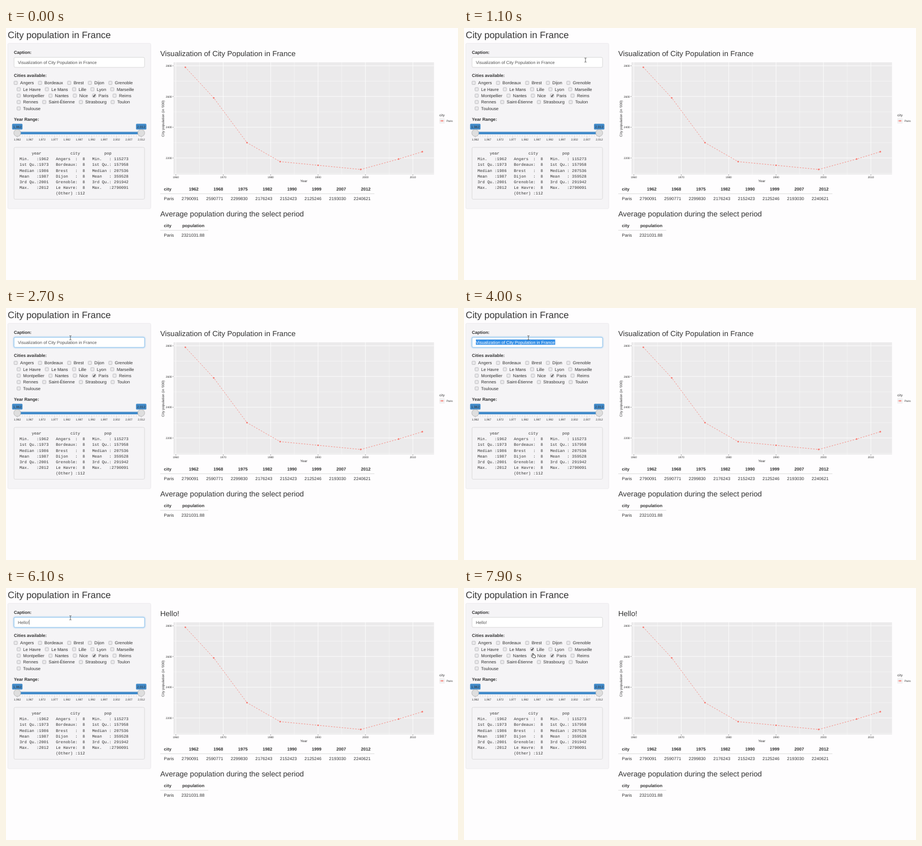
These frames come from a looping animation (800x448 px, 8 s). An HTML page:

```html
<!DOCTYPE html>
<html lang="en">
<head>
<meta charset="utf-8">
<title>City population</title>
<style>
  html, body { margin: 0; width: 100%; height: 100%; overflow: hidden; background: #fefdfe; }
  svg { display: block; }
  text { font-family: "Liberation Sans", Arial, sans-serif; fill: #333; white-space: pre; text-rendering: geometricPrecision; }
  .mono { font-family: "Liberation Mono", monospace; }
</style>
</head>
<body>
<svg id="stage" width="800" height="448" viewBox="0 0 800 448"></svg>
<script>
const stage = document.getElementById('stage');
const BODY = 7.7, HEAD = 13.2, RED = '#f8766d', BLUE = '#428bca';
const CAPTION = 'Visualization of City Population in France';

function el(tag, attrs, parent = stage) {
  const node = document.createElementNS('http://www.w3.org/2000/svg', tag);
  for (const key in attrs) node.setAttribute(key, attrs[key]);
  parent.appendChild(node);
  return node;
}
function text(str, x, y, size = BODY, attrs = {}) {
  const node = el('text', { x, y, 'font-size': size, ...attrs });
  node.textContent = str;
  return node;
}
const bold = (str, x, y, attrs) => text(str, x, y, BODY, { 'font-weight': 700, ...attrs });
const rect = (x, y, width, height, fill, attrs) => el('rect', { x, y, width, height, fill, ...attrs });
const line = (x1, y1, x2, y2, stroke, w = 1, attrs) =>
  el('line', { x1, y1, x2, y2, stroke, 'stroke-width': w, ...attrs });
const show = (node, on) => node.setAttribute('visibility', on ? 'visible' : 'hidden');
const MID = { 'text-anchor': 'middle' }, END = { 'text-anchor': 'end' };

// Sidebar
text('City population in France', 3, 17.9, 16.5);
rect(3.25, 27.25, 253, 294, '#f5f4f6', { rx: 2, stroke: '#e4e3e5', 'stroke-width': .6 });
bold('Caption:', 14, 45.9);
const glow = el('g', { fill: 'none', stroke: '#66afe9' });
for (const [d, opacity] of [[.6, .3], [1.5, .16], [2.4, .07]])
  el('rect', { x: 14.2 - d, y: 52.2 - d, width: 231 + 2 * d, height: 17.8 + 2 * d, rx: 2.2 + d, opacity }, glow);
const field = rect(14.2, 52.2, 231, 17.8, '#fff', { rx: 2.2, 'stroke-width': .7 });
const selection = rect(21, 56, 140.4, 9.4, '#358fe6');
const value = text(CAPTION, 21, 63.6);
const caret = rect(0, 56.4, .6, 8.6, '#333');

// Checkboxes flow from left to right by text width
function checkbox(x, y) {
  rect(x, y, 5.9, 5.9, '#e9e8ea', { rx: 1, stroke: '#adadb0', 'stroke-width': .7 });
  return el('path', { d: `M${x + 1.3} ${y + 3}l1.4 1.6 2.3-3.6`, fill: 'none', stroke: '#333', 'stroke-width': 1.3 });
}
bold('Cities available:', 14, 86.7);
const ticks = {};
[['Angers', 'Bordeaux', 'Brest', 'Dijon', 'Grenoble'],
 ['Le Havre', 'Le Mans', 'Lille', 'Lyon', 'Marseille'],
 ['Montpellier', 'Nantes', 'Nice', 'Paris', 'Reims'],
 ['Rennes', 'Saint-Étienne', 'Strasbourg', 'Toulon'],
 ['Toulouse']].forEach((row, i) => {
  let x = i ? 30.3 : 25;
  const y = 97.5 + 11.36 * i;
  for (const city of row) {
    ticks[city] = checkbox(x - 10.8, y - 2.9);
    show(ticks[city], city === 'Paris');
    x += text(city, x, y + 2.7).getComputedTextLength() + 18.7;
  }
});

// Range slider
bold('Year Range:', 14, 164.8);
rect(14, 184.6, 231, 4.4, '#e1e1e4', { rx: 2 });
rect(20, 184.6, 219.5, 4.4, BLUE);
for (let i = 0; i <= 50; i++) {
  const x = 20 + 4.39 * i, big = i % 5 === 0;
  line(x, 190.6, x, big ? 195 : 192.8, '#b9b9c0', .5);
  if (big) text((1962 + i).toLocaleString('en-US'), x, 200, 4.95, { ...MID, fill: '#999' });
}
for (const [x, year] of [[20, '1,962'], [239.3, '2,012']]) {
  rect(x - 9.2, 170.2, 18.4, 10.4, BLUE, { rx: 1.6 });
  text(year, x, 177.6, 6.05, { ...MID, fill: '#fff' });
  el('circle', { cx: x, cy: 186.6, r: 6.2, fill: '#dedede', stroke: '#aaa', 'stroke-width': .7 });
}

// Data summary
rect(14.2, 212.2, 231, 92.2, '#f5f4f6', { rx: 2, stroke: '#ccc', 'stroke-width': .6 });
[
  '     year            city          pop',
  'Min.   :1962   Angers  :  8   Min.   : 115273',
  '1st Qu.:1973   Bordeaux:  8   1st Qu.: 157958',
  'Median :1986   Brest   :  8   Median : 207536',
  'Mean   :1987   Dijon   :  8   Mean   : 359528',
  '3rd Qu.:2001   Grenoble:  8   3rd Qu.: 291942',
  'Max.   :2012   Le Havre:  8   Max.   :2790091',
  '               (Other) :112'
].forEach((str, i) => text(str, 24, 225.1 + 10.15 * i, 7.15, { class: 'mono' }));

// Chart
const heading = text(CAPTION, 273, 49.8, HEAD);
const px = year => 300.6 + 8.39 * (year - 1960);
const py = pop => 67.1 + .2733 * (2800 - pop);
const data = { 1962: 2790091, 1968: 2590771, 1975: 2299830, 1982: 2176243,
               1990: 2152423, 1999: 2125246, 2007: 2193030, 2012: 2240621 };
const years = Object.keys(data);
const points = years.map(y => [px(y), py(data[y] / 1000)]);
const DASH = { 'stroke-dasharray': '2.4 2.4' };

rect(296.4, 61, 461.1, 199.5, '#ebeaeb');
for (let y = 1960; y <= 2014; y += 5) {
  const x = px(y), major = y % 10 === 0;
  line(x, 61, x, 260.5, '#fff', major ? .8 : .4);
  if (!major) continue;
  line(x, 260.5, x, 262, '#333', .6);
  text(y, x, 267, 4.9, { ...MID, fill: '#4d4d4d' });
}
for (let p = 2100; p <= 2800; p += 100) {
  const y = py(p), major = p % 200 === 0;
  line(296.4, y, 757.5, y, '#fff', major ? .8 : .4);
  if (!major) continue;
  line(294.9, y, 296.4, y, '#333', .6);
  text(p, 293.6, y + 1.8, 4.9, { ...END, fill: '#4d4d4d' });
}
el('polyline', { points: points.join(' '), fill: 'none', stroke: RED, 'stroke-width': .8, ...DASH });
const dot = (cx, cy) => el('circle', { cx, cy, r: 1.4, fill: RED });
points.forEach(p => dot(...p));
text('Year', 527, 273.6, 6.15, { ...MID, fill: '#111' });
text("City population (in '000)", 0, 0, 6.2, { ...MID, fill: '#111', transform: 'translate(280.2 161) rotate(-90)' });
text('city', 767, 156.6, 6.15, { fill: '#111' });
rect(767, 160.4, 9.4, 9.4, '#f2f1f2');
line(768, 165.1, 775.5, 165.1, RED, .8, DASH);
dot(771.7, 165.1);
text('Paris', 779.5, 166.8, 4.9, { fill: '#111' });

// Tables
function table(y, right, columns) {
  bold('city', 279.5, y);
  text('Paris', 279.5, y + 17.1);
  columns.forEach(([name, val], i) => {
    const x = right + 43.5 * i;
    bold(name, x, y, END);
    text(val, x, y + 17.1, BODY, END);
  });
  line(273, y + 5.8, right + 43.5 * (columns.length - 1) + 6.8, y + 5.8, '#ddd', 1);
}
table(288.9, 340.8, years.map(y => [y, data[y]]));
text('Average population during the select period', 273, 335, HEAD);
table(353.9, 351.2, [['population', '2321031.88']]);

// Pointers, each with its hot spot at 0,0
const cursor = el('g', {});
const shapes = {
  beam: el('path', { d: 'M-1.8-3.8Q0-3.8 0-2.9Q0-3.8 1.8-3.8M0-3V3M-1.8 3.8Q0 3.8 0 2.9Q0 3.8 1.8 3.8',
    fill: 'none', stroke: '#444', 'stroke-width': .8 }, cursor),
  arrow: el('path', { d: 'M0 0V7.2L1.6 5.8 2.7 8.2 4 7.6 2.9 5.3H5Z',
    fill: '#111', stroke: '#fff', 'stroke-width': .5 }, cursor),
  hand: el('path', { d: 'M-.8.6Q0-.5.8.6V3L3.6 3.5Q4.6 3.8 4.5 5L4 8H0L-2.3 5Q-2.4 4-1.5 4.2L-.8 4.8Z',
    fill: '#fff', stroke: '#222', 'stroke-width': .8 }, cursor)
};

// [time, x, y] of the pointer, then [time, state] tables for hard changes
const path = [[100, 262, 322], [900, 215, 57], [1300, 215, 57], [2200, 114, 53], [6400, 114, 53],
              [6900, 104, 80.5], [7100, 104, 81], [7500, 121, 112], [7700, 121, 112], [7900, 122, 116]];
const pointer = [[0, ''], [100, 'arrow'], [900, 'beam'], [6600, 'arrow'], [7400, 'hand']];
const typed = [[0, CAPTION], [4200, 'H'], [4300, 'He'], [4500, 'Hel'], [4600, 'Hell'], [4800, 'Hello'], [5100, 'Hello!']];
const title = [[0, CAPTION], [5600, 'Hello!']];
const FOCUS = 2400, SELECT = 3200, TYPE = 4200, BLUR = 7700, CHECK = 7800;

const at = (steps, t) => steps.filter(s => s[0] <= t).pop()[1];
function place(t) {
  const i = path.findIndex(p => p[0] > t);
  if (i < 1) return (i ? path[path.length - 1] : path[0]).slice(1);
  const [t0, x0, y0] = path[i - 1], [t1, x1, y1] = path[i];
  const k = (t - t0) / (t1 - t0), e = k * k * (3 - 2 * k);
  return [x0 + (x1 - x0) * e, y0 + (y1 - y0) * e];
}

function draw(t) {
  const focused = t >= FOCUS && t < BLUR;
  const selected = t >= SELECT && t < TYPE;
  value.textContent = at(typed, t);
  value.style.fill = selected ? '#fff' : '#555';
  heading.textContent = at(title, t);
  field.setAttribute('stroke', focused ? '#66afe9' : '#ccc');
  show(glow, focused);
  show(selection, selected);
  show(caret, focused && t >= TYPE && (t < 5500 || (t - 5500) % 1000 >= 500));
  if (t >= TYPE) caret.setAttribute('x', 21.2 + value.getComputedTextLength());
  show(ticks.Lille, t >= CHECK);
  const kind = at(pointer, t);
  for (const name in shapes) show(shapes[name], name === kind);
  cursor.setAttribute('transform', `translate(${place(t)})`);
}

const start = performance.now();
function tick() {
  const t = (performance.now() - start) % 8000;
  draw(Math.floor(t / 100) * 100);
  requestAnimationFrame(tick);
}
tick();
</script>
</body>
</html>
```
